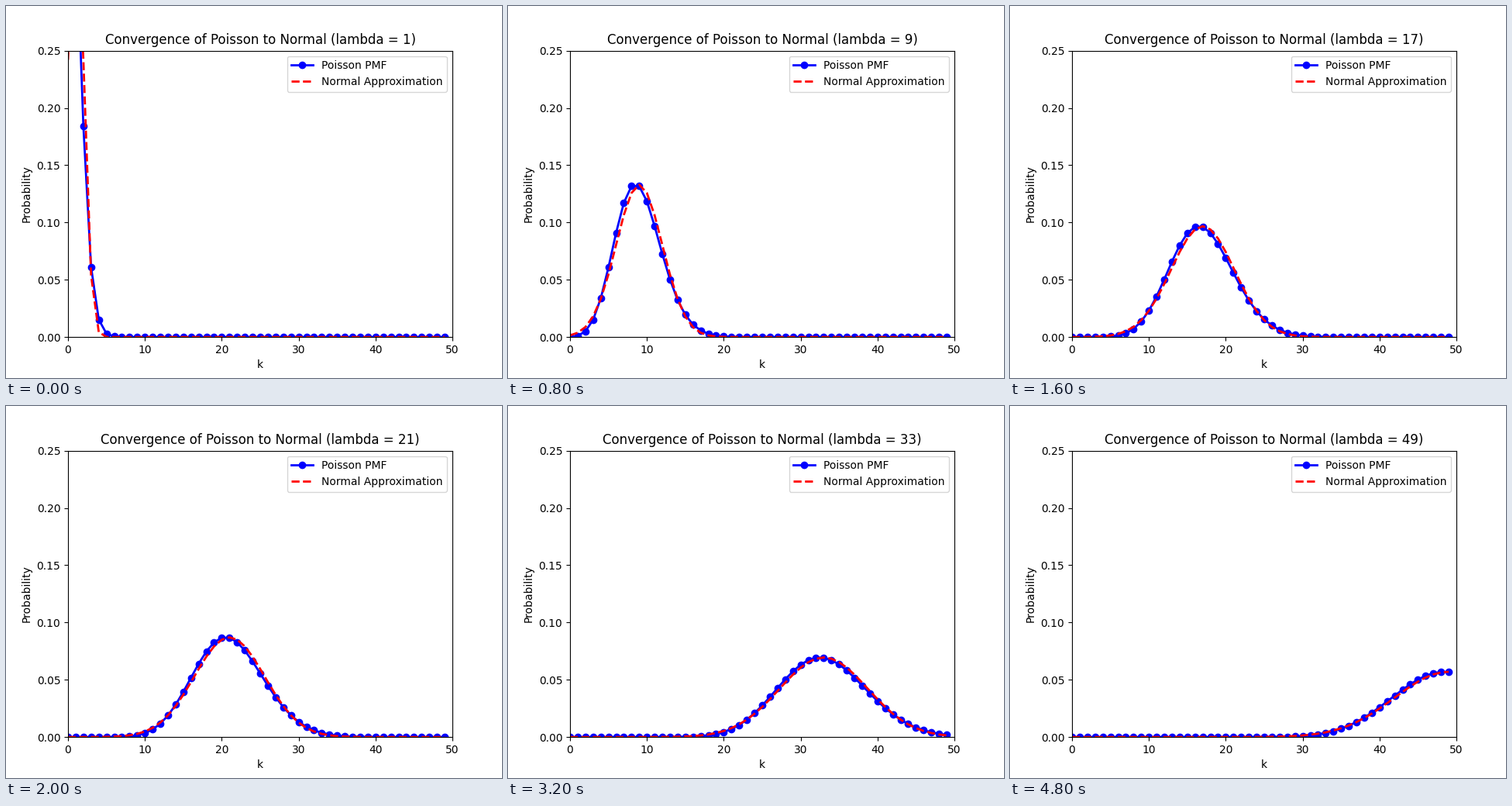
These frames come from a looping animation (640x480 px, 5000 ms). A matplotlib script:

```python
import math

import matplotlib.pyplot as plt
import numpy as np
from matplotlib.animation import FuncAnimation

FRAMES = 25
INTERVAL = 200

k = np.arange(50)
log_factorial = np.array([math.lgamma(n + 1) for n in k])


def poisson_pmf(lam):
    return np.exp(k * math.log(lam) - lam - log_factorial)


def normal_pdf(lam):
    return np.exp(-((k - lam) ** 2) / (2 * lam)) / math.sqrt(2 * math.pi * lam)


fig, ax = plt.subplots(figsize=(6.4, 4.8), dpi=100)
poisson_line, = ax.plot([], [], "bo-", lw=2, label="Poisson PMF")
normal_line, = ax.plot([], [], "r--", lw=2, label="Normal Approximation")
ax.set_xlim(0, 50)
ax.set_ylim(0, 0.25)
ax.set_xlabel("k")
ax.set_ylabel("Probability")
ax.legend(loc="upper right")


def update(frame):
    lam = 1 + 2 * frame
    poisson_line.set_data(k, poisson_pmf(lam))
    normal_line.set_data(k, normal_pdf(lam))
    ax.set_title(f"Convergence of Poisson to Normal (lambda = {lam})")
    return poisson_line, normal_line


anim = FuncAnimation(fig, update, frames=FRAMES, interval=INTERVAL,
                     init_func=lambda: update(0), repeat=True, repeat_delay=0)
plt.show()
```
